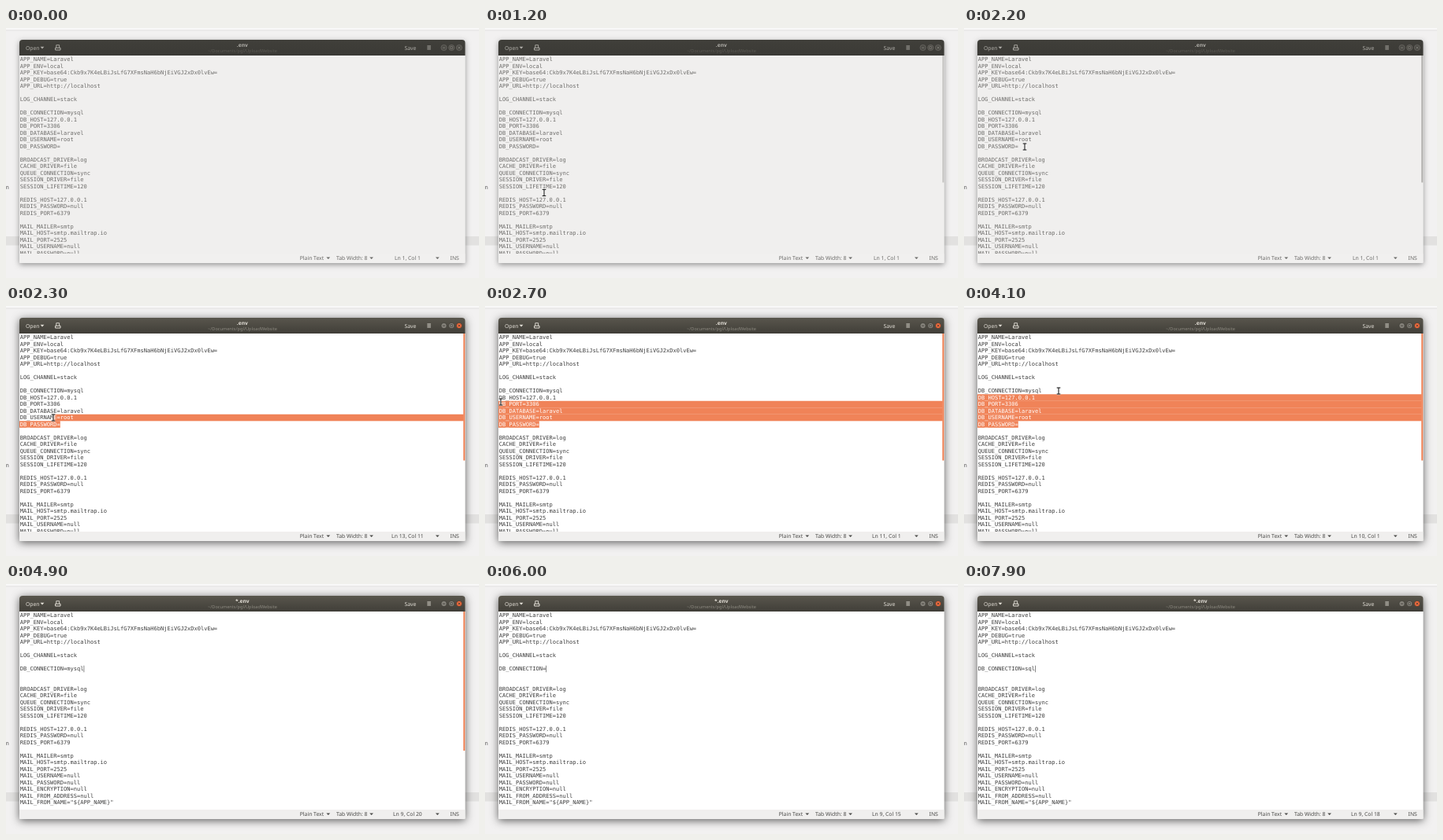
An HTML page with a canvas that plays this animation: 600 by 318 pixels, repeating every 8000 ms.

```html
<!DOCTYPE html>
<html lang="en">
<head>
<meta charset="utf-8">
<title>Editor</title>
<style>
  html, body { margin: 0; width: 100%; height: 100%; overflow: hidden; background: #f2f1f1; }
  canvas { display: block; width: 600px; height: 318px; }
</style>
</head>
<body>
<canvas id="stage"></canvas>
<script>
const W = 600, H = 318, LOOP = 8000, STEP = 100;
const LEFT = 17, RIGHT = 582.5, TOP = 15, HEAD = 35, FOOT = 287, BOTTOM = 299;
const TEXT_X = 17.8, CHAR = 4.25, ROW = 8.5, ROW_TOP = 35.75;
const MONO = '7.06px "DejaVu Sans Mono", monospace';
const ui = (size, weight = 400) => `${weight} ${size}px "Noto Sans", "Open Sans", sans-serif`;
const ORANGE = '#f08358';

const canvas = document.getElementById('stage');
const ctx = canvas.getContext('2d');
const dpr = window.devicePixelRatio || 1;
canvas.width = W * dpr;
canvas.height = H * dpr;

const before = `APP_NAME=Laravel
APP_ENV=local
APP_KEY=base64:Ckb9x7K4eLBiJsLfG7XFmsNaH6bNjEiVGJ2xDx0lvEw=
APP_DEBUG=true
APP_URL=http://localhost

LOG_CHANNEL=stack

DB_CONNECTION=mysql
DB_HOST=127.0.0.1
DB_PORT=3306
DB_DATABASE=laravel
DB_USERNAME=root
DB_PASSWORD=

BROADCAST_DRIVER=log
CACHE_DRIVER=file
QUEUE_CONNECTION=sync
SESSION_DRIVER=file
SESSION_LIFETIME=120

REDIS_HOST=127.0.0.1
REDIS_PASSWORD=null
REDIS_PORT=6379

MAIL_MAILER=smtp
MAIL_HOST=smtp.mailtrap.io
MAIL_PORT=2525
MAIL_USERNAME=null
MAIL_PASSWORD=null
MAIL_ENCRYPTION=null
MAIL_FROM_ADDRESS=null
MAIL_FROM_NAME="\${APP_NAME}"`.split('\n');
const after = [...before.slice(0, 9), '', ...before.slice(14)];

const FOCUS = 2300, CUT = 4500, CARET = 4900, LAST_SEL = 14;
// [time, line, column] of the moving end of the selection
const drag = [[2300, 13, 11], [2400, 12, 6], [2500, 12, 1], [2700, 11, 1], [2900, 10, 1]];
// [time, value] while retyping the driver name
const typing = [[0, 'mysql'], [5000, 'mysq'], [5200, 'mys'], [5500, 'my'], [5700, 'm'],
  [6000, ''], [7000, 's'], [7500, 'sq'], [7900, 'sql']];
// [time, x, y] of the pointer
const pointer = [[200, 46, 56], [300, 60, 115], [400, 78, 172], [1000, 78, 172], [1400, 72, 247],
  [1900, 79, 155], [2200, 77, 151], [2300, 60, 142], [2500, 30, 133], [2700, 20, 122],
  [2900, 19, 117], [3500, 16, 115], [3700, 28, 114], [4100, 120, 108], [4500, 123, 108]];

const clamp01 = v => Math.max(0, Math.min(1, v));
const latest = (keys, t) => keys.filter(k => k[0] <= t).pop();

function pointerAt(t) {
  if (t < pointer[0][0] || t >= CUT) return null;
  const i = pointer.findIndex(k => k[0] > t);
  const [t0, x0, y0] = pointer[i - 1], [t1, x1, y1] = pointer[i];
  const f = (t - t0) / (t1 - t0);
  return [x0 + (x1 - x0) * f, y0 + (y1 - y0) * f];
}

function stateAt(t) {
  const s = { active: t >= FOCUS, edited: t >= CUT, lines: before, pos: [1, 1], sel: null, caret: false };
  if (s.edited) {
    s.lines = after.slice();
    s.lines[8] = 'DB_CONNECTION=' + latest(typing, t)[1];
    s.caret = t >= CARET;
    s.pos = s.caret ? [9, s.lines[8].length + 1] : [10, 1];
  } else if (s.active) {
    s.pos = latest(drag, t).slice(1);
    s.sel = s.pos;
  }
  s.bar = clamp01((t - 1000) / 300) * clamp01((5700 - t) / 300);
  s.pointer = pointerAt(t);
  return s;
}

function rect(x, y, w, h, fill) {
  ctx.fillStyle = fill;
  ctx.fillRect(x, y, w, h);
}

function text(str, x, y, font, fill, align = 'left') {
  ctx.font = font;
  ctx.fillStyle = fill;
  ctx.textAlign = align;
  ctx.fillText(str, x, y);
}

function triangle(x, y, fill) {
  ctx.fillStyle = fill;
  ctx.beginPath();
  ctx.moveTo(x - 2.4, y - 1.2);
  ctx.lineTo(x + 2.4, y - 1.2);
  ctx.lineTo(x, y + 1.4);
  ctx.fill();
}

function outline(color, width, ...points) {
  ctx.strokeStyle = color;
  ctx.lineWidth = width;
  ctx.beginPath();
  points.forEach(([x, y], i) => i ? ctx.lineTo(x, y) : ctx.moveTo(x, y));
  ctx.stroke();
}

function drawDesktop() {
  rect(0, 0, W, H, '#f2f1f1');
  rect(0, 0, W, 2.5, '#f8f8f8');
  rect(0, 2.5, W, 1, '#e3e2e2');
  rect(0, 265, W, 11.5, '#e2e1e0');
  text('n', -0.5, 205, ui(7), '#555');
}

function drawFrame(active) {
  ctx.save();
  ctx.shadowColor = active ? 'rgba(0,0,0,.62)' : 'rgba(0,0,0,.4)';
  ctx.shadowBlur = (active ? 11 : 7) * dpr;
  ctx.shadowOffsetY = 2 * dpr;
  ctx.beginPath();
  ctx.roundRect(LEFT, TOP, RIGHT - LEFT, BOTTOM - TOP, [4, 4, 1, 1]);
  ctx.fillStyle = '#f0efee';
  ctx.fill();
  ctx.restore();

  const g = ctx.createLinearGradient(0, TOP, 0, HEAD);
  g.addColorStop(0, active ? '#59564d' : '#403f3a');
  g.addColorStop(1, active ? '#403e38' : '#3b3a36');
  ctx.fillStyle = g;
  ctx.beginPath();
  ctx.roundRect(LEFT, TOP, RIGHT - LEFT, HEAD - TOP, [4, 4, 0, 0]);
  ctx.fill();
}

function drawHeader({ active, edited }) {
  const ink = active ? '#e4e0d8' : '#b1afa9';
  text('Open', 25, 27.5, ui(6.8), ink);
  triangle(46, 25, ink);
  text('Save', 505.5, 27.5, ui(6.8), ink);
  text(edited ? '*.env' : '.env', 299.8, 24, ui(6.6, 700), ink, 'center');
  text('~/Documents/pgl/UploadWebsite', 300, 31, ui(5.6), active ? '#8d8a81' : '#5b5953', 'center');

  // new-document icon
  outline(ink, 0.9, [63.8, 25], [63.8, 21.7], [67.6, 21.7], [67.6, 25]);
  outline(ink, 1, [62.6, 25.2], [62.6, 28], [69, 28], [69, 25.2], [62.6, 25.2]);

  for (const y of [23, 25, 27]) rect(534.3, y - 0.5, 4.6, 0.9, ink);

  [555.5, 565.2, 574.8].forEach((x, i) => {
    const close = i === 2 && active;
    ctx.beginPath();
    ctx.arc(x, 25, 3.6, 0, Math.PI * 2);
    ctx.fillStyle = close ? '#ee6a3c' : active ? '#85827a' : '#4b4a45';
    ctx.fill();
    ctx.strokeStyle = active ? '#35332e' : '#77756f';
    ctx.lineWidth = 0.6;
    ctx.stroke();
    const mark = active ? '#3b3934' : '#85837d';
    if (i === 0) rect(x - 1.5, 24.7, 3, 0.8, mark);
    if (i === 1) {
      ctx.strokeStyle = mark;
      ctx.strokeRect(x - 1.3, 23.7, 2.6, 2.6);
    }
    if (i === 2) {
      outline(mark, 0.8, [x - 1.3, 23.7], [x + 1.3, 26.3]);
      outline(mark, 0.8, [x + 1.3, 23.7], [x - 1.3, 26.3]);
    }
  });
}

function drawEditor({ active, edited, lines, sel, caret, pos, bar }) {
  const ink = active ? '#3d3d3d' : '#6e6d6b';
  ctx.save();
  ctx.beginPath();
  ctx.rect(LEFT, HEAD, RIGHT - LEFT, FOOT - HEAD);
  ctx.clip();
  rect(LEFT, HEAD, RIGHT - LEFT, FOOT - HEAD, active ? '#fff' : '#f0efee');

  lines.forEach((line, i) => {
    const n = i + 1, y = ROW_TOP + i * ROW, base = y + 6.6;
    const chosen = sel && n >= sel[0] && n <= LAST_SEL;
    const from = !chosen ? line.length : n === sel[0] ? sel[1] - 1 : 0;
    if (chosen) {
      const x0 = from ? TEXT_X + from * CHAR : LEFT;
      const x1 = n === LAST_SEL ? TEXT_X + line.length * CHAR : 580.5;
      rect(x0, y, x1 - x0, ROW + 0.05, ORANGE);
    }
    text(line.slice(0, from), TEXT_X, base, MONO, ink);
    text(line.slice(from), TEXT_X + from * CHAR, base, MONO, '#fff');
  });

  if (caret) rect(TEXT_X + (pos[1] - 1) * CHAR, ROW_TOP + (pos[0] - 1) * ROW, 0.7, ROW, '#555');

  ctx.globalAlpha = bar;
  rect(580.2, HEAD, 2.3, (edited ? 212 : 196.5) - HEAD, active ? ORANGE : '#b3b1af');
  ctx.restore();
}

function drawStatus({ active, pos }) {
  const ink = active ? '#4a4a48' : '#6b6a68', y = 295;
  rect(LEFT, FOOT, RIGHT - LEFT, BOTTOM - FOOT - 0.5, active ? '#f0efee' : '#f1f0ef');
  text('Plain Text', 372.7, y, ui(6.8), ink);
  text('Tab Width: 8', 419, y, ui(6.8), ink);
  text(`Ln ${pos[0]}, Col ${pos[1]}`, 509.4, y, ui(6.8), ink, 'center');
  text('INS', 563.6, y, ui(6.8), ink);
  for (const x of [408.8, 463.6, 547.3]) triangle(x, 292.6, ink);
}

function drawPointer([x, y]) {
  for (const [color, width] of [['rgba(255,255,255,.75)', 2.4], ['#1c1c1c', 1.1]]) {
    outline(color, width, [x, y - 4], [x, y + 4]);
    outline(color, width, [x - 2.3, y - 4], [x + 2.3, y - 4]);
    outline(color, width, [x - 2.3, y + 4], [x + 2.3, y + 4]);
  }
}

function draw(t) {
  const s = stateAt(t);
  ctx.setTransform(dpr, 0, 0, dpr, 0, 0);
  ctx.textRendering = 'geometricPrecision';
  drawDesktop();
  drawFrame(s.active);
  drawHeader(s);
  drawEditor(s);
  drawStatus(s);
  if (s.pointer) drawPointer(s.pointer);
}

const start = performance.now();
function tick() {
  const t = (performance.now() - start) % LOOP;
  draw(Math.floor(t / STEP) * STEP);
  requestAnimationFrame(tick);
}
tick();
</script>
</body>
</html>
```
